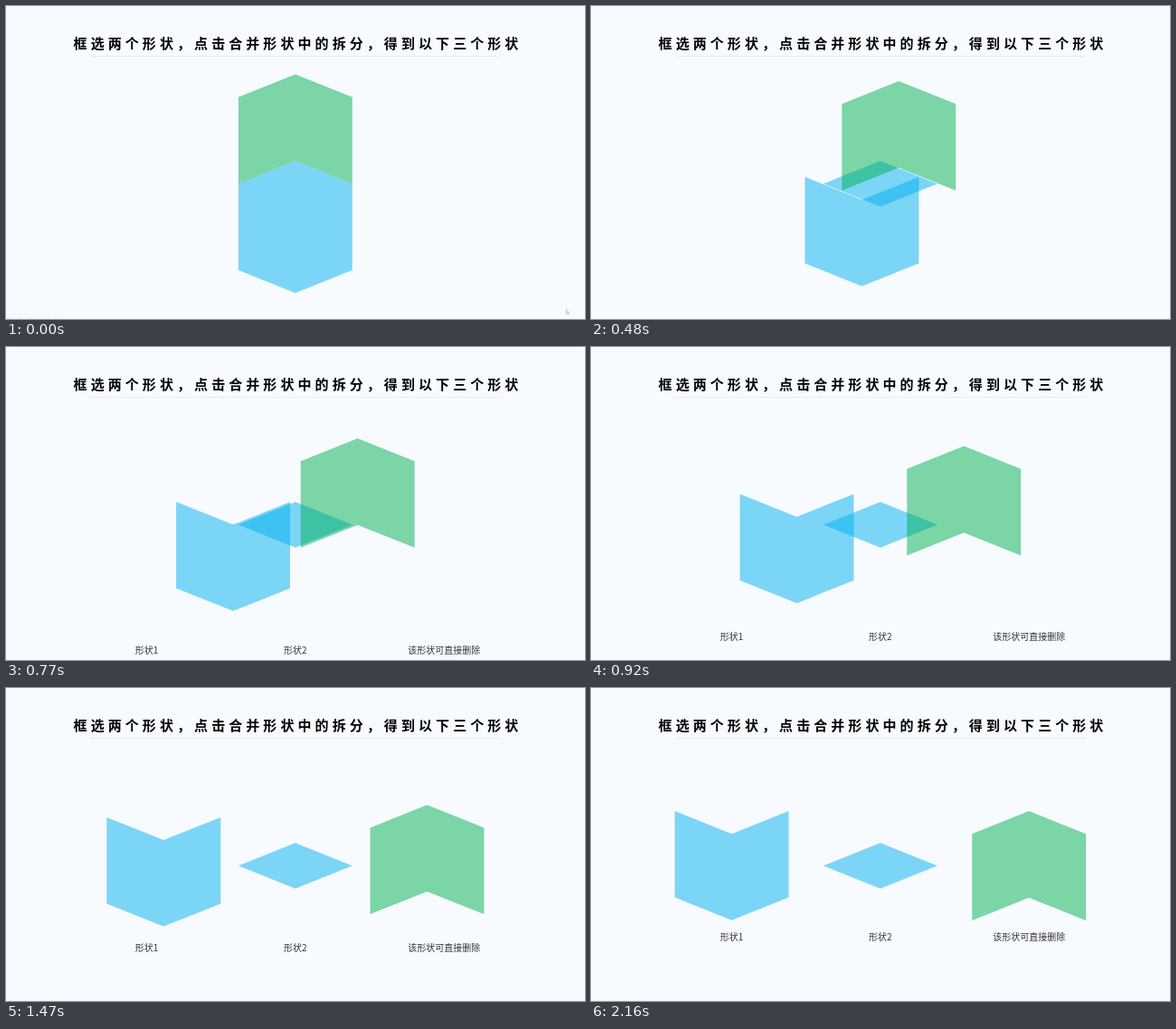
These frames come from a looping animation (640x346 px, 3.26 s). An HTML page:

```html
<!DOCTYPE html>
<html lang="zh-CN">
<head>
<meta charset="utf-8">
<title>拆分形状</title>
<style>
  html, body { margin: 0; height: 100%; overflow: hidden; background: #f7fbff; }
  svg { display: block; width: 100%; height: 100%; }
  text { font-family: "Noto Sans CJK SC", "Noto Sans CJK", sans-serif; }
  .title { font-size: 15px; font-weight: 700; letter-spacing: 4.07px; }
  .labels { font-size: 10px; fill: #333; text-anchor: middle; }
  .shapes { fill-opacity: .5; }
</style>
</head>
<body>
<svg viewBox="0 0 640 346">
  <text class="title" x="74.6" y="47">框选两个形状，点击合并形状中的拆分，得到以下三个形状</text>
  <path d="M93 55.5H547" stroke="#e5ecf0"/>
  <path d="M0 345.5H640" stroke="#f1f4f7"/>
  <g class="shapes">
    <path id="whole" fill="#00b0f0" d="M256.9 196.5L319.8 171.3L382.8 196.5V292L319.8 317.2L256.9 292Z"/>
    <g id="parts">
      <path fill="#00b0f0" d="M256.9 196.5L319.8 171.3L382.8 196.5L319.8 221.7Z"/>
      <path id="lower" fill="#00b0f0" d="M256.9 196.5L319.8 221.7L382.8 196.5V292L319.8 317.2L256.9 292Z"/>
    </g>
    <path id="upper" fill="#00b050" d="M256.9 100.8L319.8 75.6L382.8 100.8V196.5L319.8 171.3L256.9 196.5Z"/>
  </g>
  <g id="labels" class="labels">
    <text x="155.6" y="279.2">形状1</text>
    <text x="319.9" y="279.2">形状2</text>
    <text x="484.3" y="279.2">该形状可直接删除</text>
  </g>
  <g id="pointer">
    <path d="M619.5 335.5V340.5L620.7 339.4L621.5 341L622 340.6L621.4 339.1H622.4Z" fill="#fff" stroke="#8a9098" stroke-width=".5"/>
    <path d="M3 345H56" stroke="#e4e8ec" stroke-dasharray="5 5"/>
  </g>
</svg>
<script>
const LOOP = 3260;
const STEP = 2160 / 28;   // the picture advances in even steps, then rests
const FIRST_STEP = 2, LAST_STEP = 28;
const TRAVEL = { x: 164.3, y: 60.5, label: 103 };

// Cubic Bezier easing with flat ends; x1 and x2 are the handle positions.
function ease(x, x1 = .26, x2 = .34) {
  let low = 0, high = 1;
  for (let i = 0; i < 24; i++) {
    const s = (low + high) / 2, r = 1 - s;
    if (3 * s * r * (r * x1 + s * x2) + s ** 3 < x) low = s;
    else high = s;
  }
  return low * low * (3 - 2 * low);
}

function progress(time) {
  const step = Math.floor((time + 8) / STEP);
  const x = (step - FIRST_STEP) / (LAST_STEP - FIRST_STEP);
  return x <= 0 ? 0 : x >= 1 ? 1 : ease(x);
}

const byId = id => document.getElementById(id);
const move = (id, x, y) => byId(id).setAttribute("transform", `translate(${x} ${y})`);
const show = (id, visible) => byId(id).setAttribute("visibility", visible ? "visible" : "hidden");

function draw(time) {
  const p = progress(time);
  move("lower", -TRAVEL.x * p, -TRAVEL.y * p);
  move("upper", TRAVEL.x * p, TRAVEL.y * p);
  move("labels", 0, TRAVEL.label * (1 - p));
  show("whole", p === 0);
  show("parts", p > 0);
  show("pointer", p === 0);
}

const start = performance.now();
function frame() {
  draw((performance.now() - start) % LOOP);
  requestAnimationFrame(frame);
}
frame();
</script>
</body>
</html>
```
